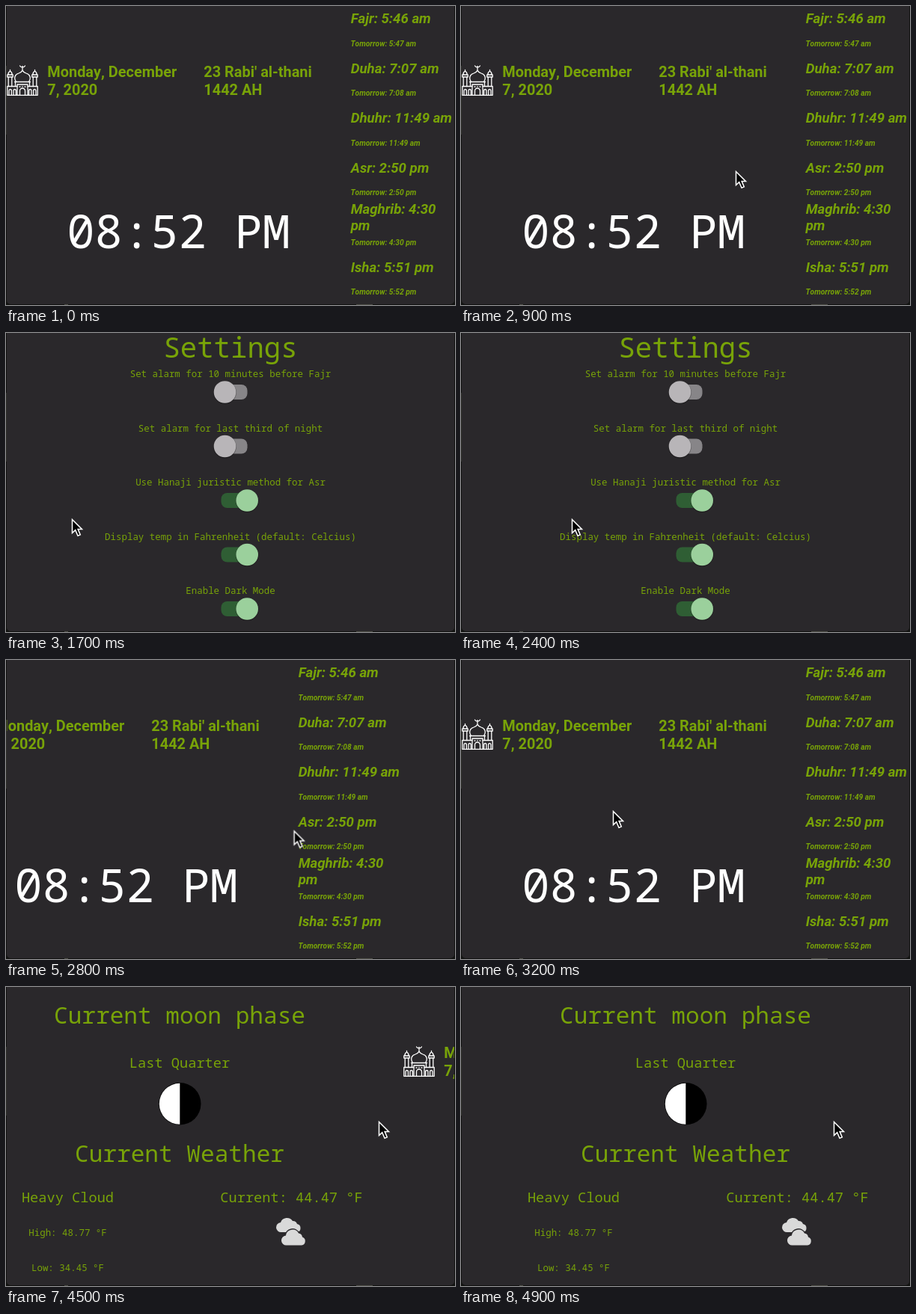
An HTML page for the animation above (5 s loop, 600x400 px).

```html
<!DOCTYPE html>
<html lang="en">
<head>
<meta charset="utf-8">
<title>Prayer times</title>
<style>
  html, body { margin: 0; width: 100%; height: 100%; overflow: hidden; background: #111210; }
  svg { display: block; width: 600px; height: 400px; }
  text { fill: #78a308; white-space: pre; font-kerning: none; }
  .mono { font-family: "Roboto Mono", "Noto Sans Mono", monospace; text-anchor: middle; }
  .small { font-size: 12.44px; }
  .medium { font-size: 18.67px; }
  .large { font-size: 31.11px; }
  .title { font-size: 37.33px; }
  .clock { font-size: 62.22px; font-weight: 500; fill: #fff; }
  .date, .prayer, .next { font-family: Roboto, sans-serif; font-weight: 700; }
  .date { font-size: 19.91px; }
  .prayer { font-size: 18.67px; font-style: italic; }
  .next { font-size: 10.2px; font-style: italic; }
  .icon { fill: none; stroke: #fff; stroke-width: 1.3; stroke-linejoin: round; stroke-linecap: round; }

  #track { animation: swipe 5s step-end infinite; }
  #cursor { animation: point 5s step-end infinite; }

  @keyframes swipe {
    0%, 22% { transform: translateX(0); }
    24% { transform: translateX(-60px); }
    26% { transform: translateX(-230px); }
    28% { transform: translateX(-380.5px); }
    30% { transform: translateX(-510px); }
    32% { transform: translateX(-577px); }
    34%, 48% { transform: translateX(-598px); }
    50% { transform: translateX(-560px); }
    52% { transform: translateX(-390px); }
    54% { transform: translateX(-190px); }
    56% { transform: translateX(-70px); }
    58% { transform: translateX(-15px); }
    60%, 80% { transform: translateX(0); }
    82% { transform: translateX(25px); }
    84% { transform: translateX(86px); }
    86% { transform: translateX(173px); }
    88% { transform: translateX(390px); }
    90% { transform: translateX(530px); }
    92% { transform: translateX(585px); }
    94%, 100% { transform: translateX(598px); }
  }
  @keyframes point {
    0% { transform: translate(430px, 420px); }
    8% { transform: translate(422px, 385px); animation-timing-function: steps(5); }
    18% { transform: translate(367px, 221px); animation-timing-function: steps(2); }
    22% { transform: translate(468px, 240px); }
    24% { transform: translate(408px, 245px); }
    26% { transform: translate(239px, 249px); }
    28%, 38% { transform: translate(88px, 249px); }
    38% { animation-timing-function: steps(5); }
    48% { transform: translate(148px, 249px); }
    50% { transform: translate(186px, 246px); }
    52% { transform: translate(355px, 240px); }
    54% { transform: translate(430px, 235px); animation-timing-function: steps(5); }
    64% { transform: translate(203px, 202px); animation-timing-function: steps(7); }
    78%, 80% { transform: translate(325px, 180px); }
    82% { transform: translate(350px, 180px); }
    84% { transform: translate(411px, 180px); }
    86%, 100% { transform: translate(498px, 180px); }
  }
</style>
</head>
<body>
<svg viewBox="0 0 600 400">
  <defs>
    <clipPath id="frame"><rect x="1" y="-10" width="598" height="409" rx="5"/></clipPath>
    <g id="wing">
      <path d="M5.500 87V85.500M3 92Q2.500 89 5.500 87 8.500 89 8 92M1.800 92H9.200V95H1.800ZM3.200 95V107.500M7.800 95V107.500"/>
      <path d="M15 107.500H1.800V119.300H15M4 119V113.500A1.700 2 0 0 1 7.400 113.500V119M10 119V113.500A1.700 2 0 0 1 13.400 113.500V119"/>
    </g>
  </defs>
  <path d="M0 80V172M78 399.5h5M468 399.5h22" stroke="#4c4d45" fill="none"/>
  <g clip-path="url(#frame)">
    <rect width="600" height="400" fill="#2a282b"/>
    <g id="track">
      <g transform="translate(-598)">
        <text class="mono large" x="300" y="49">Current moon phase</text>
        <text class="mono medium" x="300" y="108">Last Quarter</text>
        <circle cx="300.3" cy="156.3" r="28.2"/>
        <path d="M300.3 128.8a27.5 27.5 0 0 0 0 55z" fill="#fff"/>
        <text class="mono large" x="300" y="233.5">Current Weather</text>
        <text class="mono medium" x="150.5" y="288">Heavy Cloud</text>
        <text class="mono medium" x="449.5" y="288">Current: 44.47 °F</text>
        <text class="mono small" x="150.5" y="332.7">High: 48.77 °F</text>
        <text class="mono small" x="150.5" y="380">Low: 34.45 °F</text>
        <g fill="#d9d9d9">
          <path d="M436 328a6.5 6.5 0 0 1-1-13 9 9 0 0 1 16-2 6 6 0 0 1 6 4 5.6 5.6 0 0 1 0 11z"/>
          <path d="M443 345.5a6.5 6.5 0 0 1-1-13 9 9 0 0 1 17-3 6 6 0 0 1 5 5 5.7 5.7 0 0 1-1 11z"
            stroke="#2a282b" stroke-width="3" paint-order="stroke"/>
        </g>
      </g>

      <g id="home">
        <g class="icon">
          <use href="#wing"/>
          <use href="#wing" transform="matrix(-1 0 0 1 44 0)"/>
          <path d="M18.500 80A4 4 0 0 0 25.500 80M22 80.500V86M13.500 101.500C10 96 12 91.500 17 90Q21 88.500 22 86 23 88.500 27 90C32 91.500 34 96 30.500 101.500"/>
          <path d="M11.500 101.500H32.500M12.500 101.500V107.500M31.500 101.500V107.500M15 105H29V119.300H15ZM18.500 119V113.500A3.500 3.500 0 0 1 25.500 113.500V119M18 108H19M22 107.500V108M25 108H26"/>
        </g>
        <text class="date" x="55.3" y="95">Monday, December</text>
        <text class="date" x="55.3" y="118.5">7, 2020</text>
        <text class="date" x="264.3" y="95">23 Rabi' al-thani</text>
        <text class="date" x="264.3" y="118.5">1442 AH</text>
        <text class="mono clock" x="230.6" y="324">08:52 PM</text>
      </g>

      <g id="settings" transform="translate(598)">
        <text class="mono title" x="300" y="33">Settings</text>
      </g>
    </g>
  </g>
  <path id="cursor" d="M.5.5V18.5L4.7 14.6 8 22.3 11.3 20.9 8.1 13.4H13.5Z"
    fill="#000" stroke="#fff" stroke-width="1.5"/>
</svg>
<script>
  const add = (id, markup) => document.getElementById(id).insertAdjacentHTML('beforeend', markup);

  const prayers = [
    ['Fajr: 5:46 am', '5:47 am'],
    ['Duha: 7:07 am', '7:08 am'],
    ['Dhuhr: 11:49 am', '11:49 am'],
    ['Asr: 2:50 pm', '2:50 pm'],
    ['Maghrib: 4:30|pm', '4:30 pm'],
    ['Isha: 5:51 pm', '5:52 pm']
  ];
  prayers.forEach(([today, next], row) => {
    const y = 23.4 + row * 66.5;
    const lines = today.split('|');
    const top = y - (lines.length - 1) * 11;
    lines.forEach((line, i) =>
      add('home', `<text class="prayer" x="460.7" y="${top + i * 22}">${line}</text>`));
    add('home', `<text class="next" x="460.5" y="${y + 30.1}">Tomorrow: ${next}</text>`);
  });

  const options = [
    ['Set alarm for 10 minutes before Fajr', false],
    ['Set alarm for last third of night', false],
    ['Use Hanaji juristic method for Asr', true],
    ['Display temp in Fahrenheit (default: Celcius)', true],
    ['Enable Dark Mode', true]
  ];
  options.forEach(([label, on], row) => {
    const y = 79 + row * 72.5;
    const knob = on ? 322.2 : 292.5;
    add('settings', `
      <text class="mono small" x="300" y="${y - 19.7}">${label}</text>
      <rect x="287.5" y="${y - 10}" width="35" height="20" rx="8" fill="${on ? '#2f5e34' : '#878588'}"/>
      <circle cx="${knob}" cy="${y + 0.6}" r="15.4" fill="#000" opacity=".3"/>
      <circle cx="${knob}" cy="${y}" r="14.8" fill="${on ? '#9bd09c' : '#b8b5b8'}"/>`);
  });
</script>
</body>
</html>
```
